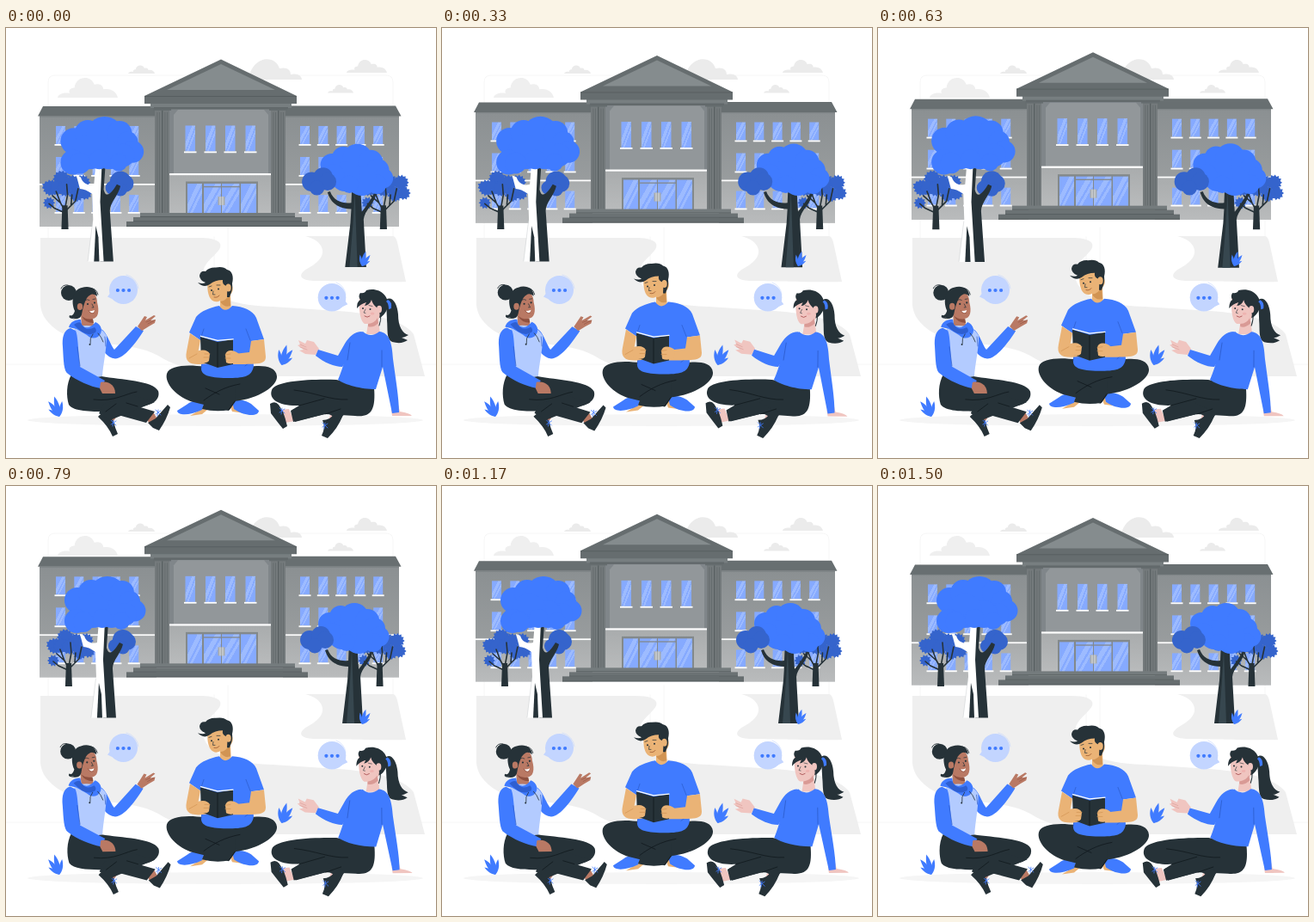
Animation, 500 px wide and 500 px high, one loop 1540 ms. Source, as an HTML page:

```html
<!DOCTYPE html>
<html lang="en">
<head>
<meta charset="utf-8">
<title>Students on campus</title>
<style>
html, body { margin: 0; width: 100%; height: 100%; overflow: hidden; background: #fff; }
svg { display: block; width: 100vw; height: 100vh; }
</style>
</head>
<body>
<svg id="stage" viewBox="0 0 500 500">
<defs>
  <linearGradient id="glass" x1="0" y1="0" x2="1" y2="1">
    <stop offset=".34" stop-color="#86aaff"/><stop offset=".34" stop-color="#9dbbff"/>
    <stop offset=".5" stop-color="#9dbbff"/><stop offset=".5" stop-color="#86aaff"/>
    <stop offset=".57" stop-color="#86aaff"/><stop offset=".57" stop-color="#9dbbff"/>
    <stop offset=".66" stop-color="#9dbbff"/><stop offset=".66" stop-color="#86aaff"/>
  </linearGradient>
  <linearGradient id="wall" x1="0" y1="0" x2="0" y2="1">
    <stop offset="0" stop-color="#8b9092"/><stop offset="1" stop-color="#a1a4a5"/>
  </linearGradient>
  <linearGradient id="lower" x1="0" y1="0" x2="0" y2="1">
    <stop offset="0" stop-color="#a9acad"/><stop offset="1" stop-color="#b9bbbc"/>
  </linearGradient>
</defs>
<g id="back"></g><g id="hall"></g><g id="trees"></g><g id="front"></g>
<g id="reader"></g><g id="left"></g><g id="right"></g>
</svg>
<script>
const BLUE = '#407bff', NAVY = '#3564cc', DARK = '#263238', PALE = '#ebebeb', INK = '#11191d';
const el = id => document.getElementById(id);
const path = (d, fill) => `<path d="${d}" fill="${fill}"/>`;
const line = (d, color, w = 1) =>
  `<path d="${d}" fill="none" stroke="${color}" stroke-width="${w}" stroke-linecap="round" stroke-linejoin="round"/>`;
const rect = (x, y, w, h, fill) => `<rect x="${x}" y="${y}" width="${w}" height="${h}" fill="${fill}"/>`;
const oval = (x, y, rx, ry, fill) => `<ellipse cx="${x}" cy="${y}" rx="${rx}" ry="${ry}" fill="${fill}"/>`;
const dot = (x, y, r, fill) => oval(x, y, r, r, fill);
const blob = (fill, list) => list.map(c => dot(...c, fill)).join('');
const each = (list, fn) => list.map(fn).join('');

function cloud(x, y, w, h, fill = PALE) {
  const d = 'M0 1C.02 .78 .12 .74 .2 .78C.17 .55 .25 .5 .28 .5C.3 -.12 .56 -.16 .61 .34' +
    'C.72 .25 .76 .44 .76 .58C.88 .5 .98 .7 1 1Z';
  return `<g transform="translate(${x} ${y}) scale(${w} ${h})">${path(d, fill)}</g>`;
}

function plant(x, y, s, lean) {
  const leaf = (a, k) => `<path transform="rotate(${a}) scale(${k})" d="M0 0C-4 -7 -4 -15 0 -23C3 -15 3.5 -7 0 0Z" fill="${BLUE}"/>`;
  return `<g transform="translate(${x} ${y}) scale(${s * lean} ${s})">` +
    each([[-10, .8], [14, 1.05], [36, .95], [56, .66]], a => leaf(...a)) + '</g>';
}

function bubble(x, y, r, side) {
  return dot(x, y, r, '#c3d5ff') +
    path(`M${x + side * (r - 4)} ${y}L${x + side * (r + 2)} ${y + 8}L${x + side * 6} ${y + 14}Z`, '#c3d5ff') +
    each([-6.6, 0, 6.6], k => dot(x + k, y + .5, 2.1, BLUE));
}

function pane(x, y, w, h) {
  return rect(x, y, w, h, 'url(#glass)') + rect(x - 1.5, y + h, w + 3, 1.8, '#fff');
}

el('back').innerHTML =
  line('M49 245V63Q49 55 57 55H442Q450 55 450 63V242M242 243V305M258 232V300M50 332H230M0 391H500', '#f4f4f4', .8) +
  cloud(60, 58, 70, 23, '#efefef') + cloud(142, 43.5, 31, 9.5) + cloud(374, 66, 30, 9.5) +
  cloud(396, 37, 47, 15) +
  path('M282 60C286 32 313 30 318 47C327 45 331 49 331 54C339 52 344 56 344 60Z', PALE) +
  path('M40 244H225C246 244 255 250 246 260C238 269 230 274 229 285C229 303 246 322 310 324L385 329C430 332 462 340 474 356L487 405H300C250 405 205 399 177 381C145 363 89 371 62 353C45 342 40 330 40 320Z', '#efefef') +
  path('M348 242H450Q453 242 455 249L465 295C430 296 378 294 358 294C341 293 339 287 350 280C365 272 372 263 366 253C363 247 355 244 348 242Z', '#efefef') +
  oval(255, 456, 230, 7, '#f5f5f5');

function wing(x, w, first) {
  return rect(x, 102, w, 129, 'url(#wall)') + rect(x, 183, w, 48, 'url(#lower)') +
    rect(x, 181, w, 1.8, '#fff') +
    each([[114, 21], [150, 21], [194, 20]], ([y, h]) =>
      each([0, 1, 2, 3, 4], i => pane(first + i * 21.3, y, 11, h)));
}

function columns(x) {
  return rect(x, 95, 17, 121, '#747a7c') + rect(x - 2, 93, 21, 3, '#666d6f') +
    rect(x + 8, 96, 1.4, 120, '#5a6163') +
    each([2.5, 5, 11.5, 14], k => rect(x + k, 98, .8, 117, '#62696b'));
}

el('hall').innerHTML =
  wing(39, 136, 58) + wing(322, 135, 342) +
  path('M37 102.5L43 91H176V102.5ZM324 102.5V90.5H453L459.5 102.5Z', '#686f71') +
  rect(39, 102.5, 136, 1.2, '#7f8587') + rect(324, 102.5, 133, 1.2, '#7f8587') +
  rect(188, 92, 122, 126, '#80868a') +
  path('M195 216V101L200 95H300L305 101V216Z', '#92979a') +
  rect(190, 171, 118, 46, 'url(#lower)') + rect(190, 169, 118, 2.2, '#fff') +
  each([208.5, 232, 255, 278.5], x => pane(x, 113.5, 11.5, 30)) +
  rect(209, 178.5, 84, 38, '#83898b') +
  each([[211, 17], [230, 20], [251, 20.5], [273, 18]], ([x, w]) => rect(x, 181, w, 35, 'url(#glass)')) +
  rect(229, 184, 43, 1.3, '#83898b') + rect(246.5, 196, 8, 10, '#a8acae') +
  rect(248.5, 196, 1, 10, '#dce0e2') + rect(251.5, 196, 1, 10, '#dce0e2') +
  columns(173) + columns(308) +
  rect(168, 87, 164, 6, '#777e80') + rect(172, 92, 156, 2.5, '#62696b') +
  path('M161 88V79L250 36.5L338 79V88Z', '#666d6f') +
  path('M187 72L250 42L313 72Z', '#858c8e') + rect(161, 79, 177, .9, '#565d5f') +
  rect(156, 215, 180, 5, '#747b7d') + rect(148, 220, 196, 5, '#6b7274') + rect(140, 225, 211, 6, '#666d6f') +
  rect(156, 219, 180, 1, '#565d5f') + rect(148, 224.3, 196, 1, '#565d5f') + rect(140, 230, 211, 1, '#565d5f');

// a clump of leaves with a jagged rim
function tuft(x, y, r) {
  const n = Math.round(r * 1.6) * 2;
  const pts = Array.from({ length: n }, (_, i) => {
    const a = i / n * 2 * Math.PI, k = i % 2 ? r - 1 : r + 1;
    return (x + k * Math.cos(a)).toFixed(1) + ' ' + (y + k * Math.sin(a)).toFixed(1);
  });
  return path('M' + pts.join('L') + 'Z', NAVY);
}

function bush(x) {
  const twig = list => 'M' + list.map(([k, y]) => x + k + ' ' + y).join('L');
  return each([[-16, 186, 8.5], [-4, 176, 9], [8, 180, 8], [20, 180, 8], [23, 192, 7], [13, 193, 8],
      [-18, 203, 6], [-9, 186, 8], [-21, 184, 4.5], [0, 187, 8]], ([k, y, r]) => tuft(x + k, y, r)) +
    line(twig([[0, 212], [-5, 203], [-10, 190]]) + twig([[0, 210], [3, 194], [2, 182]]) +
      twig([[2, 211], [12, 201], [15, 187]]) + twig([[-1, 214], [-12, 209], [-18, 204]]) +
      twig([[7, 205], [8, 194]]) + twig([[-5, 203], [-14, 195]]), DARK, 1.6) +
    path(`M${x - 3} 206H${x + 3}L${x + 4} 233H${x - 4}Z`, DARK);
}

el('trees').innerHTML =
  bush(73) + bush(434.5) +
  // left tree
  blob(NAVY, [[136, 179, 12], [141, 181, 10], [127, 186, 8], [136, 188, 7.5]]) +
  path('M108 160H119L117 188C120 200 127 190 132 182L136 184C134 194 124 203 124 212L128 269.5H113Z', DARK) +
  path('M108 158H115L113 202L117 269.5H99L105 222L104 193C99 189 94 187 90 187L86 172L91 174C93 181 99 184 106 182Z', '#fff') +
  path('M108 229L111 242L112 269.5H106Z', DARK) + line('M99 269L104.5 224', '#c9cdcf', .5) +
  blob(BLUE, [[83, 133, 15], [99, 124, 15], [118, 126, 21], [135, 124, 14], [144, 134, 12], [150, 145, 12.5],
    [139, 149, 13], [123, 149, 16], [101, 145, 20], [82, 157, 14], [90, 158, 12], [134, 157, 10], [112, 154, 11]]) +
  // right tree
  path('M399 180H408L410 213C415 207 420 200 424 192L426 194C424 204 413 212 412 222L415 276H391L397 226L398 210C388 210 380 206 376 201C373 197 372 194 371 191L374 190C378 201 388 204 398 203Z', DARK) +
  path('M402 190L405 276H396L400 226Z', '#37474f') +
  blob(BLUE, [[376, 160, 13], [389, 152, 13], [405, 153, 17], [420, 157, 14], [428, 166, 13], [434, 175, 11.5],
    [427, 182, 11], [410, 178, 17], [391, 173, 17], [378, 171, 12], [396, 182, 10]]) +
  blob(NAVY, [[353, 179, 11], [366, 174, 11], [371, 179, 10], [359, 186, 8.5]]);

el('front').innerHTML = plant(62, 452, 1, -1) + plant(320.5, 392, 1, 1) + plant(414, 277, .74, 1) +
  bubble(136.5, 304.5, 16.5, -1) + bubble(379, 313.3, 16.3, 1) +
  line('M140 287A18 18 0 0 1 154 303M384 296A17 17 0 0 1 395 310', '#c3d5ff', .6);

const TAN = '#eab376', TAN2 = '#d19453';
el('reader').innerHTML =
  path('M233 433L227 443L214 451L228 449L240 439ZM258 433L263 446L278 448L268 437Z', TAN) +
  path('M227 433C221 432 215 434 210 438L199 445C200 451 213 451 228 444L231 435ZM263 434C271 431 279 433 285 437L294 445C294 451 280 453 265 443Z', BLUE) +
  path('M231 394C212 391 190 392 187 402C184 413 199 430 218 435L259 445L266 434C294 431 316 416 315 405C314 392 295 392 283 394Z', DARK) +
  path('M266 415C255 416 241 424 232 432L228 443Q244 447 260 444L267 434Z', DARK) +
  line('M272 414C255 417 242 424 230 433M248 426L232 419M266 434L259 444', INK, .8) +
  path('M236 290C233 296 234 310 238 315C241 319 246 319 249 317L249 332H262L261 310C265 306 265 298 259 297L255 286Z', TAN) +
  path('M249 318Q256 317 260 310L261 323Q254 326 249 318Z', TAN2) +
  path('M223 296Q229 298 232 296Q225 293 225 288Q226 282 232 283Q236 278 244 278.5Q253 277 257 281C263 282 265 289 263 297C264 305 261 309 260 313L257 313Q258 306 256 300Q251 298 252 293Q243 293 237 298Q230 303 223 296Z', DARK) +
  oval(258.5, 302, 3.2, 4.5, TAN) + dot(239, 305, 1, DARK) + dot(247, 303.5, 1, DARK) +
  line('M236 301L239 300M245 299L249 299M241 306L240.5 310L243 310', DARK, .7) +
  line('M242 313Q246 314 248 311', '#9b572f', .8) +
  path('M248 323C252 329 257 330 263 323C276 324 287 328 291 337L300 362L285 364L288 393C286 406 276 407 257 407C235 407 227 403 227 396L229 360L226 363L213 354L221 336C227 329 237 325 248 323Z', BLUE) +
  line('M226 362L230 350M284 363L279 350M229 384L227 395M286 385Q282 391 278 393', '#2b5bc9', .7) +
  path('M214 355L210 376C207 390 216 393 235 390L234 379L223 379L226 363ZM285 364L300 362L302 382C302 391 296 391 260 391L257 380L283 377Z', TAN) +
  path('M226 359L246 365L264 362L264 391L246 395L227 388Z', DARK) +
  line('M226.5 358.3L246 363.5L264 361.8', '#fff', 1.3) + line('M246 366V394', INK, .8) +
  path('M220 377C227 373 235 374 237 379L236 387C233 391 226 389 220 386ZM271 379C264 373 256 374 255 380L256 389Q262 392 270 388Z', TAN) +
  line('M237 379L231 379M236 383L230 383M255 380L261 379M255 384L261 384M222 379L213 384', TAN2, .7);

const BROWN = '#b97964', BROWN2 = '#8f5140';
const laces = (x, y) => line(`M${x - 3} ${y - 3}L${x + 3} ${y + 3}M${x - 3} ${y + 2}L${x + 3} ${y - 2}M${x} ${y - 3}L${x - 1} ${y + 4}`, BLUE, .8);
el('left').innerHTML =
  path('M108 452L121 444L131 448L125 457ZM160 446L171 446L176 455L166 459Z', BROWN) +
  path('M107 452Q112 446 117 449L125 457Q127 466 130 472L124 475Q119 463 107 452ZM165 459L174 454Q181 446 188 438L191 441Q187 455 178 468L171 465Z', DARK) +
  laces(125, 459) + laces(177, 447) +
  path('M76 403C70 414 70 428 73 438C79 446 98 446 116 446L163 459L173 446L153 440C170 440 180 432 177 422C171 410 134 409 111 405Z', DARK) +
  path('M143 426L114 437L108 448L121 456L173 435Z', DARK) +
  line('M152 423C139 425 126 435 102 432M116 446L128 437M153 440L140 436', INK, .8) +
  dot(73, 308, 9, DARK) +
  path('M88 306C99 303 106 309 106 319C109 330 107 338 100 338L103 348Q97 355 88 348L87 333C80 325 80 312 88 306Z', BROWN) +
  path('M88 335Q94 340 101 338L102 343Q92 343 88 335Z', BROWN2) +
  path('M78 337Q72 338 74 334Q78 336 80 329C75 318 78 304 88 302C96 299 106 302 106 312Q100 306 94 314Q90 321 88 333Q86 340 78 337Z', DARK) +
  line('M96 303Q105 301 107 310M75 337Q84 340 87 334M64 303Q66 298 72 299', DARK, .9) +
  oval(86, 324, 3.2, 4, BROWN) + dot(95, 321, 1.1, DARK) + dot(103, 319.5, 1.1, DARK) +
  line('M92 316.5Q95 315 97 316.5M101 315.5L104 315M100 321L102 325L100 325', DARK, .7) +
  path('M96.5 329Q100 329.5 103 328Q102 332 99.5 331.5Z', '#fff') + line('M96 328.5Q98 333 102 331.5', BROWN2, .7) +
  path('M110 350C117 352 121 368 126 374L151 347L160 352C151 366 138 384 127 384.5C117 384 110 372 106 363Z', BLUE) +
  path('M153 347L157 341L161 335L164 336L162 340L172 334L174 335L168 340L174 339L173 343L166 347L158 352Z', BROWN) +
  line('M168 340L163 342M173 340L165 344', BROWN2, .6) +
  path('M84 347C74 350 78 370 80 383L82 404Q98 408 112 405C113 390 117 375 117 358C112 348 99 344 84 347Z', '#b3cbff') +
  path('M75 349C67 351 65 360 66 371C67 387 67 399 72 402C82 410 98 417 110 419L115 410L86 394C84 379 84 358 81 352Z', BLUE) +
  line('M83 371L86 393M116 370L115 359', '#2b5bc9', .7) +
  path('M110 412C120 410 127 416 127 425L112 425L109 419Z', BROWN) +
  path('M73 348C75 341 81 339 87 339L88 345Q95 353 104 342C111 345 114 353 107 359Q100 363 94 357L82 350Z', BLUE) +
  path('M79 345Q84 341 87 343Q92 354 103 348Q106 351 104 354Q93 361 79 345Z', '#2e5fd1') +
  line('M101 356Q97 361 98 367M107 355Q111 359 113 365', DARK, .8) + dot(97.5, 368, 1, DARK);

const PINK = '#f0c5c0', PINK2 = '#d99a95';
el('right').innerHTML =
  path('M442 316C448 311 455 319 456 333C456 347 461 355 468 357Q463 360 460 360L467 363Q460 368 449 365C442 362 444 350 443 340Z', DARK) +
  path('M318 444L329 443L335 457L325 459ZM377 450L391 450L386 460L374 459Z', PINK) +
  path('M307 437Q313 433 317 438L322 446Q325 454 327 463L322 466Q317 460 308 448ZM368 456Q377 456 381 449L391 452Q386 465 374 477L367 474Q372 464 368 456Z', DARK) +
  laces(321, 445) + laces(371, 462) +
  path('M384 409C356 408 313 410 309 421C305 432 318 440 341 439L331 445L334 458L371 449L406 451C425 453 430 444 428 418Z', DARK) +
  path('M380 428L333 444L336 458L374 448L388 456L394 448L370 436Z', DARK) +
  line('M335 421C360 424 377 433 397 432M341 439L370 431M371 449L389 443', INK, .8) +
  path('M411 314C410 329 412 341 417 344L421 344L419 356H435L433 339C440 332 439 316 428 310Z', PINK) +
  path('M421 344Q429 343 432 337L433 343Q427 349 421 347Z', PINK2) +
  path('M408 326Q408 318 412 316Q409 312 412 308Q417 309 419 305C434 301 446 311 444 325Q440 335 434 337Q436 330 431 325Q426 321 425 316Q423 322 417 323L419 319Q412 321 408 326Z', DARK) +
  line('M431 323Q439 332 434 346', DARK, 1) +
  path('M444 316Q449 318 448 326L445 327Q445 320 442 318Z', BLUE) +
  oval(434, 327, 3, 4.2, PINK) + dot(415, 326, 1, DARK) + dot(423.5, 327, 1, DARK) +
  oval(426, 332, 2.4, 1.5, '#eeb3b0') +
  line('M422 322.5L426 323.5M418 327L416 331L418 331.5', DARK, .6) +
  line('M417 335Q420 337.5 423 335', '#a54749', .8) +
  path('M364 373L358 365L350 363L348 367L340 363L342 368L339 369L346 374L341 375L348 379L360 380Z', PINK) +
  line('M342 368L349 371M342 371L350 374', PINK2, .6) +
  path('M448 444L449 451L472 451Q470 448 458 446L456 438Z', PINK) +
  path('M414 353C405 353 399 359 394 367L386 381L363 374L360 381C370 389 382 394 391 394L399 382Z', BLUE) +
  path('M415 353Q424 361 434 353C446 354 449 367 450 385C453 408 457 430 457 447L449 448L438 394L430 420C413 420 394 415 386 409C393 394 397 371 404 358Z', BLUE) +
  line('M437 375L437 394M400 366L397 386', '#2b5bc9', .8);

const LOOP = 1540, STEP = LOOP / 37, CYCLE = 1500, LEAD = 32;
const BEAT = [[0, 1], [180, 1.1], [350, 1.02], [525, 1.1], [850, 1], [1600, 1]];
const TILT = [[0, 0], [170, .5], [330, .5], [630, .2], [850, -.9], [1600, -.9]];

// cubic-bezier(.25, .1, .25, 1)
function ease(x) {
  let lo = 0, hi = 1;
  for (let i = 0; i < 24; i++) {
    const s = (lo + hi) / 2, r = 1 - s;
    if (.75 * r * r * s + .75 * r * s * s + s ** 3 < x) lo = s; else hi = s;
  }
  const r = 1 - lo;
  return .3 * r * r * lo + 3 * r * lo * lo + lo ** 3;
}

function track(keys, t, curve = x => x) {
  const i = keys.findIndex(k => k[0] > t);
  const [t0, a] = keys[i - 1], [t1, b] = keys[i];
  return a + (b - a) * curve((t - t0) / (t1 - t0));
}

function draw(ms) {
  const t = Math.floor((ms % LOOP + 5) / STEP) % 37 * STEP;
  const p = Math.min(t + LEAD, CYCLE);
  const lift = .4 - 10 * (1 - Math.abs(1 - 2 * p / CYCLE));
  const set = (id, v) => el(id).setAttribute('transform', v);
  set('hall', `translate(0 ${lift})`);
  set('reader', `translate(0 ${lift})`);
  set('trees', `translate(256 191) scale(${track(BEAT, p, ease)}) translate(-256 -191)`);
  const tilt = track(TILT, t);
  set('left', `rotate(${tilt} 125 388)`);
  set('right', `rotate(${tilt} 388 390)`);
}

const start = performance.now();
function tick() {
  draw(performance.now() - start);
  requestAnimationFrame(tick);
}
tick();
</script>
</body>
</html>
```
